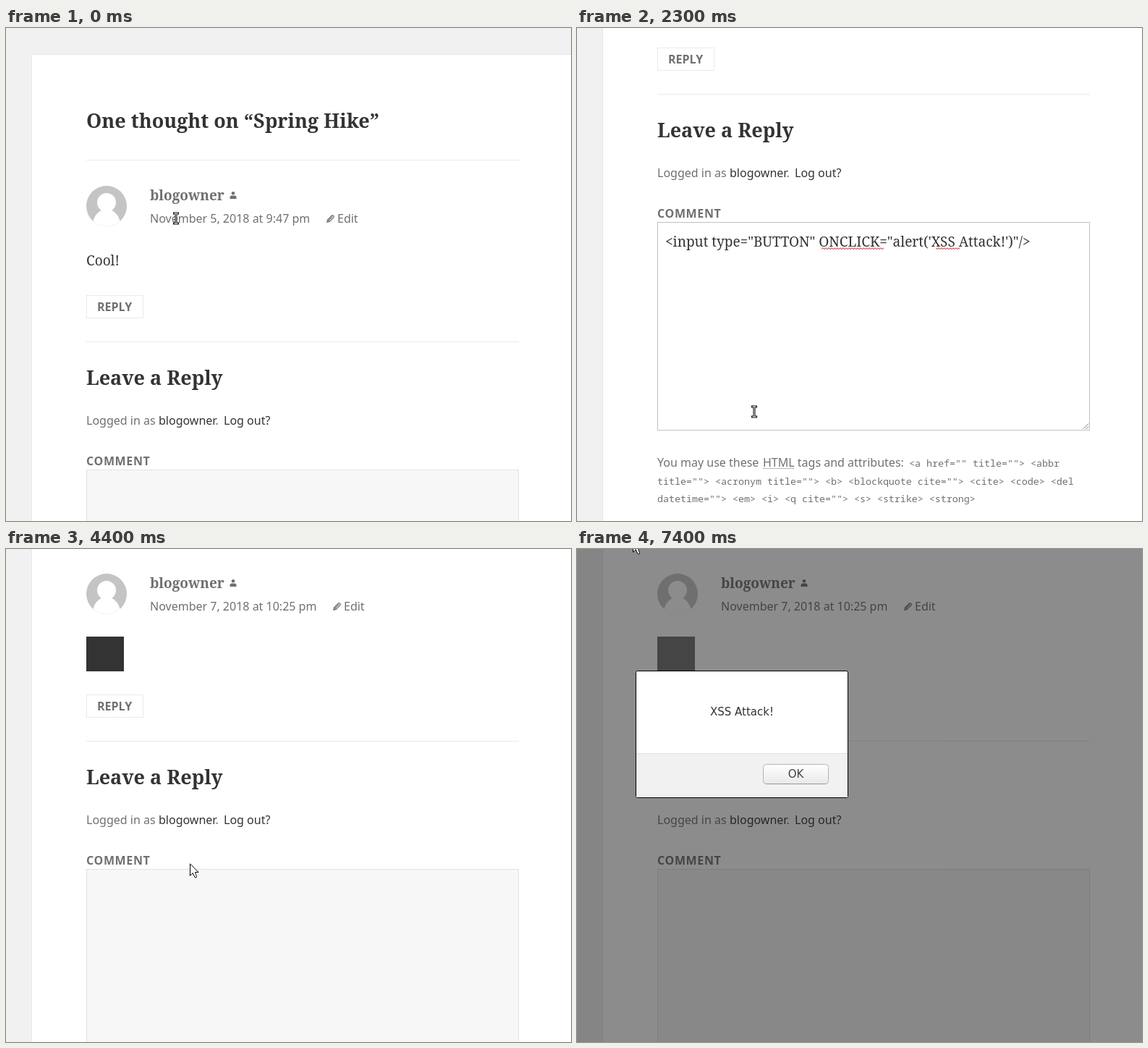
Write an HTML page that moves like this. It is 781 px wide and 681 px high and loops after 7500 ms.

```html
<!DOCTYPE html>
<html lang="en">
<head>
<meta charset="utf-8">
<title>Comment form demo</title>
<style>
html, body { margin: 0; width: 100%; height: 100%; overflow: hidden; background: #f1f1f1; }
svg { display: block; width: 781px; height: 681px; }
text { font: 16px "Noto Sans", sans-serif; fill: #707070; white-space: pre; }
.dark { fill: #333; }
.bold { font-weight: 700; }
.title { font: 700 27px "Noto Serif", serif; fill: #333; }
.author { font: 700 19px "Noto Serif", serif; }
.body { font: 19px "Noto Serif", serif; fill: #333; }
.mono { font: 13.333px "Noto Sans Mono", monospace; }
.label { font-weight: 700; letter-spacing: .04em; }
.ui { font: 15px "DejaVu Sans", sans-serif; text-anchor: middle; }
.rule { stroke: #eaeaea; }

/* Every part steps through its states on one shared 7.5 s loop. */
.anim { animation: 7.5s step-end infinite; }
.page { animation-name: scroll; }
.head { animation-name: lift; }
.before { animation-name: before; }
.after { animation-name: after; }
.reply { fill: #fff; stroke: #eaeaea; animation-name: reply; }
.field { fill: #f7f7f7; stroke: #e2e2e2; animation-name: field; }
.draft { animation-name: draft; }
.draft text { animation-name: ink; }
.caret { animation-name: caret; }
.submit { fill: #333; animation-name: submit; }
.injected { fill: #333; animation-name: injected; }
.dialog { animation-name: dialog; }
.mouse { animation-name: mouse; }
.beam { animation-name: beam; }
.hand { animation-name: hand; }
.arrow { animation-name: arrow; }

@keyframes scroll {
  0% { transform: translateY(0); }
  2.66% { transform: translateY(-12px); }
  3.99% { transform: translateY(-76px); }
  5.33% { transform: translateY(-124px); }
  6.66% { transform: translateY(-140px); }
  27.99% { transform: translateY(-172px); }
  29.33% { transform: translateY(-254px); }
  30.66% { transform: translateY(-342px); }
  31.99% { transform: translateY(-404px); }
  33.33% { transform: translateY(-424px); }
  38.66% { transform: translateY(-482px); }
  58.66%, 100% { transform: translateY(-168px); }
}
@keyframes lift {
  0% { transform: translateY(0); }
  58.66%, 100% { transform: translateY(-16px); }
}
@keyframes before { 0% { opacity: 1; } 58.66%, 100% { opacity: 0; } }
@keyframes after { 0% { opacity: 0; } 58.66%, 100% { opacity: 1; } }
@keyframes field {
  0%, 46.66%, 100% { fill: #f7f7f7; stroke: #e2e2e2; }
  15.99% { fill: #fff; stroke: #c1c1c1; }
}
@keyframes draft { 0%, 58.66%, 100% { opacity: 0; } 21.33% { opacity: 1; } }
@keyframes ink { 0% { fill: #333; } 46.66%, 100% { fill: #707070; } }
@keyframes caret {
  0%, 27.99%, 100% { opacity: 0; transform: translateX(122px); }
  15.99% { opacity: 1; transform: translateX(122px); }
  21.33% { opacity: 1; transform: translateX(633px); }
}
@keyframes submit { 0%, 58.66%, 100% { fill: #333; } 41.33% { fill: #707070; } }
@keyframes reply { 0%, 66.66%, 100% { stroke: #eaeaea; } 65.33% { stroke: #333; } }
@keyframes injected { 0% { fill: #333; } 69.33%, 100% { fill: #707070; } }
@keyframes dialog { 0% { opacity: 0; } 78.66%, 100% { opacity: 1; } }
@keyframes mouse {
  0% { transform: translate(235px, 263px); }
  7.99% { transform: translate(237px, 305px); }
  9.33% { transform: translate(240px, 390px); }
  10.66% { transform: translate(243px, 475px); }
  11.99% { transform: translate(245px, 526px); }
  13.33% { transform: translate(245px, 530px); }
  38.66% { transform: translate(245px, 561px); }
  41.33% { transform: translate(247px, 562px); }
  42.66% { transform: translate(249px, 566px); }
  43.99% { transform: translate(251px, 569px); }
  55.99% { transform: translate(254px, 460px); }
  58.66% { transform: translate(254px, 434px); }
  63.99% { transform: translate(222px, 340px); }
  65.33% { transform: translate(165px, 222px); }
  66.66% { transform: translate(139px, 168px); }
  69.33% { transform: translate(135px, 156px); }
  85.33% { transform: translate(137px, 122px); }
  86.66% { transform: translate(139px, 98px); }
  90.66% { transform: translate(124px, 75px); }
  91.99% { transform: translate(107px, 49px); }
  94.66% { transform: translate(92px, 19px); }
  95.99% { transform: translate(77px, -10px); }
  98.66%, 100% { transform: translate(77px, -13px); }
}
@keyframes beam { 0%, 55.99% { opacity: 1; } 41.33%, 58.66%, 100% { opacity: 0; } }
@keyframes hand {
  0%, 55.99%, 66.66%, 77.33%, 100% { opacity: 0; }
  41.33%, 65.33%, 69.33% { opacity: 1; }
}
@keyframes arrow {
  0%, 65.33%, 69.33% { opacity: 0; }
  58.66%, 66.66%, 77.33%, 100% { opacity: 1; }
}
</style>
</head>
<body>
<svg viewBox="0 0 781 681">
  <defs>
    <pattern id="wave" width="4" height="3" y="645" patternUnits="userSpaceOnUse">
      <path d="M-1 -.2L2 2.6L5 -.2" fill="none" stroke="#d21414"/>
    </pattern>
    <linearGradient id="sheen" x2="0" y2="1">
      <stop stop-color="#fff"/><stop offset="1" stop-color="#e9e9e9"/>
    </linearGradient>
    <clipPath id="disc"><circle cx="139" cy="246" r="28"/></clipPath>
    <g id="pencil" fill="none" stroke="#707070" stroke-width="1.2">
      <path d="M443.8 268.2L444.6 264.8L450.4 259Q451.2 258.2 452 259L453 260Q453.8 260.8 453 261.6L447.2 267.4ZM445.8 266L451.4 260.4M444.6 264.8L447.2 267.4"/>
    </g>
  </defs>

  <rect width="781" height="681" fill="#f1f1f1"/>

  <g class="anim page">
    <rect x="35.5" y="36.5" width="800" height="1122" fill="#fff" stroke="#e6e6e6"/>

    <g class="anim head">
      <text class="title" x="111" y="138">One thought on “Spring Hike”</text>
      <path class="rule" d="M111 182.5H709"/>
      <g clip-path="url(#disc)">
        <rect x="111" y="218" width="56" height="56" fill="#c4c4c4"/>
        <circle cx="139" cy="241" r="13" fill="#fff"/>
        <ellipse cx="139" cy="276" rx="20" ry="26" fill="#fff"/>
      </g>
      <text class="author" x="199" y="238">blogowner</text>
      <g fill="#707070">
        <circle cx="314" cy="228.2" r="2.3"/>
        <path d="M309.5 236V234Q309.5 231.5 312 231.5H316Q318.5 231.5 318.5 234V236Z"/>
      </g>
      <g class="anim before">
        <text x="199" y="269">November 5, 2018 at 9:47 pm</text>
        <use href="#pencil"/>
        <text x="458" y="269">Edit</text>
        <text class="body" x="111" y="328">Cool!</text>
      </g>
      <g class="anim after">
        <text x="199" y="269">November 7, 2018 at 10:25 pm</text>
        <use href="#pencil" x="9"/>
        <text x="467" y="269">Edit</text>
        <rect class="anim injected" x="111" y="305" width="52" height="48"/>
      </g>
    </g>

    <rect class="anim reply" x="111.5" y="369.5" width="78" height="31"/>
    <text class="bold" x="126" y="391">REPLY</text>
    <path class="rule" d="M111 433.5H709"/>

    <text class="title" x="111" y="493">Leave a Reply</text>
    <text x="111" y="548">Logged in as <tspan class="dark" x="211">blogowner</tspan>. <tspan class="dark" x="301">Log out?</tspan></text>
    <text class="label" x="111" y="604">COMMENT</text>

    <rect class="anim field" x="111.5" y="610.5" width="597" height="287"/>
    <path d="M699.5 896L707 888.5M703.5 896L707 892.5" stroke="#777"/>
    <g class="anim draft">
      <text class="anim body" x="122" y="644">&lt;input type="BUTTON" ONCLICK="alert('XSS Attack!')"/&gt;</text>
      <path d="M338 645h86v3h-86zM496 645h33v3h-33z" fill="url(#wave)"/>
    </g>
    <rect class="anim caret" y="624" width="2" height="26" fill="#222"/>

    <text x="111" y="948">You may use these <tspan x="257">HTML</tspan> tags and attributes:</text>
    <path d="M257 950.5H301" stroke="#707070" stroke-dasharray="1 1"/>
    <text class="mono" x="459" y="948">&lt;a href="" title=""&gt; &lt;abbr</text>
    <text class="mono" x="111" y="973">title=""&gt; &lt;acronym title=""&gt; &lt;b&gt; &lt;blockquote cite=""&gt; &lt;cite&gt; &lt;code&gt; &lt;del</text>
    <text class="mono" x="111" y="997">datetime=""&gt; &lt;em&gt; &lt;i&gt; &lt;q cite=""&gt; &lt;s&gt; &lt;strike&gt; &lt;strong&gt;</text>

    <rect class="anim submit" x="111" y="1036" width="598" height="48"/>
    <text class="bold" x="410" y="1066" text-anchor="middle" style="fill:#fff">POST COMMENT</text>
  </g>

  <g class="anim dialog">
    <rect width="781" height="681" fill="#1a1a1a" fill-opacity=".5"/>
    <rect x="81.5" y="168.5" width="293" height="175" rx="2" fill="#fff" stroke="#000"/>
    <path d="M82 282H374V343H82Z" fill="#f1f1f1"/>
    <path d="M82 282.5H374" stroke="#e2e2e2"/>
    <text class="ui dark" x="228" y="230">XSS Attack!</text>
    <rect x="257.5" y="297.5" width="90" height="27" rx="4" fill="url(#sheen)" stroke="#b4b4b4"/>
    <path d="M261 324.5H344" stroke="#999"/>
    <text class="ui" x="302.5" y="316" style="fill:#444">OK</text>
  </g>

  <g class="anim mouse">
    <g class="anim beam" fill="none" stroke-linecap="square">
      <path d="M-2.5 -7H2.5M0 -7V7M-2.5 7H2.5" stroke="#000" stroke-width="3"/>
      <path d="M-2.5 -7H2.5M0 -7V7M-2.5 7H2.5" stroke="#fff"/>
    </g>
    <g class="anim hand" fill="#fff" stroke="#000" stroke-linejoin="round">
      <path d="M-1.7 9V1Q-1.7 -.5 0 -.5T1.7 1V5.5Q3.2 4.5 4.6 5.8Q6.2 5 7.6 6.3Q10.5 6 10.5 8.5V11L9 15.5H-.5L-4.5 10.2Q-4.6 8.2 -3 8.4Z"/>
      <path d="M1.7 5.5V8.5M4.6 6V8.5M7.6 6.5V8.5" fill="none"/>
    </g>
    <path class="anim arrow" d="M.5 .8V17.3L4.3 13.6L6.8 19.3Q7.8 20.6 9.4 19.4Q9.8 18.8 7.4 12.5H12Z" fill="#fff" stroke="#000" stroke-linejoin="round"/>
  </g>
</svg>
</body>
</html>
```
